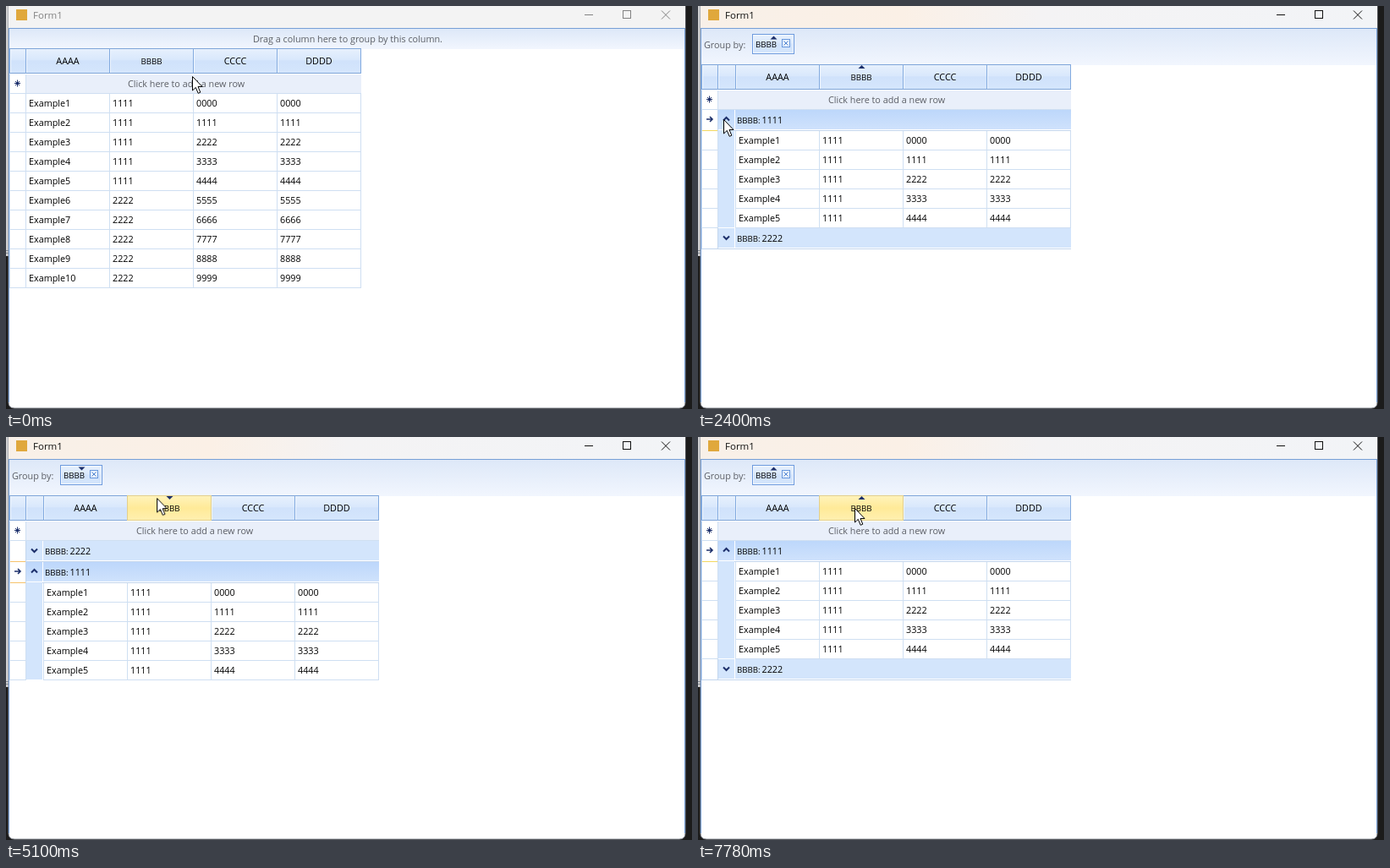
These frames come from a looping animation (811 px wide and 477 px high, 8 s). An HTML page:

```html
<!DOCTYPE html>
<html lang="en">
<head>
<meta charset="utf-8">
<title>Grouped grid</title>
<style>
html, body { margin: 0; width: 100%; height: 100%; overflow: hidden; background: #1b1b1b; }
svg { display: block; width: 811px; height: 477px; }
text { font: 10.8px "Open Sans", "Noto Sans", sans-serif; fill: #000; }
text.field { font-size: 9.7px; }
text.hint { fill: #5c5f66; }
text.title { font-size: 11.5px; }
.mid { text-anchor: middle; }
rect { shape-rendering: crispEdges; }
</style>
</head>
<body>
<svg id="stage" viewBox="0 0 811 477">
  <defs>
    <linearGradient id="active">
      <stop offset="0" stop-color="#f8f0e8"/><stop offset=".3" stop-color="#fbf0e6"/>
      <stop offset=".5" stop-color="#f4f3f4"/><stop offset="1" stop-color="#f2f4f7"/>
    </linearGradient>
    <linearGradient id="panel" x2="0" y2="1">
      <stop offset="0" stop-color="#dde8f8"/><stop offset="1" stop-color="#f2f6fe"/>
    </linearGradient>
    <linearGradient id="head" x2="0" y2="1">
      <stop offset="0" stop-color="#e8f1fd"/><stop offset=".45" stop-color="#d9e8fc"/>
      <stop offset=".5" stop-color="#d0e2fb"/><stop offset="1" stop-color="#d5e6fc"/>
    </linearGradient>
    <linearGradient id="hover" x2="0" y2="1">
      <stop offset="0" stop-color="#fff3bb"/><stop offset=".5" stop-color="#ffea98"/>
      <stop offset="1" stop-color="#fff0b0"/>
    </linearGradient>
    <linearGradient id="press" x2="0" y2="1">
      <stop offset="0" stop-color="#f9c682"/><stop offset=".3" stop-color="#ffbf6c"/>
      <stop offset="1" stop-color="#ffd598"/>
    </linearGradient>
    <linearGradient id="current" x2="0" y2="1">
      <stop offset="0" stop-color="#bdd7fb"/><stop offset="1" stop-color="#cfe2fc"/>
    </linearGradient>
    <linearGradient id="ghost">
      <stop offset="0" stop-color="#ffb45c" stop-opacity=".42"/>
      <stop offset=".6" stop-color="#ffc987" stop-opacity=".32"/>
      <stop offset="1" stop-color="#ffe3c0" stop-opacity=".08"/>
    </linearGradient>
    <linearGradient id="ghostEdge" gradientUnits="userSpaceOnUse" x1="-50" x2="50">
      <stop offset="0" stop-color="#ef9440" stop-opacity=".8"/>
      <stop offset="1" stop-color="#ef9440" stop-opacity=".1"/>
    </linearGradient>
  </defs>
</svg>
<script>
const LOOP = 8000;
const BLUE = '#769fd6', LINE = '#cfdff2', NAVY = '#1c2f6b', GROUP = '#d3e5fc', ORANGE = '#ee8a2e';
const stage = document.getElementById('stage');

function add(parent, tag, attrs = {}, content = '') {
  const node = document.createElementNS(stage.namespaceURI, tag);
  for (const key in attrs) node.setAttribute(key, attrs[key]);
  node.textContent = content;
  return parent.appendChild(node);
}
const group = parent => add(parent, 'g');
const box = (parent, x, y, width, height, fill) => add(parent, 'rect', { x, y, width, height, fill });
const frame = (parent, x, y, width, height, fill, stroke) =>
  add(parent, 'rect', { x: x + .5, y: y + .5, width: width - 1, height: height - 1, fill, stroke });
const label = (parent, x, y, content, cls = '') => add(parent, 'text', { x, y, class: cls }, content);
const line = (parent, d, stroke, width = 1) =>
  add(parent, 'path', { d, stroke, fill: 'none', 'stroke-width': width });

// Visible only inside the given time ranges.
function show(node, ...ranges) {
  const steps = new Map([[0, 0]]);
  for (const [from, to] of ranges) steps.set(from, 1).set(to, to === LOOP ? 1 : 0);
  if (!steps.has(LOOP)) steps.set(LOOP, 0);
  const frames = [...steps].map(([t, opacity]) => ({ offset: t / LOOP, opacity, easing: 'steps(1, end)' }));
  node.animate(frames, { duration: LOOP, iterations: Infinity });
  return node;
}

const FLAT = [[0, 1290]], GROUPED = [[1290, LOOP]];
const ASC = [[1290, 3360], [5890, 6700], [7360, LOOP]];
const DESC = [[3360, 5890], [6700, 7360]];
const HEAD_PRESS = [[3230, 3430], [4160, 4290], [4620, 4760]];
const HEAD_HOVER = [[2890, 3230], [3430, 4160], [4290, 4620], [4760, 5140], [7640, LOOP]];
const CHIP_PRESS = [[5760, 5890], [6570, 6700], [7230, 7360]];
const CHIP_HOVER = [[5390, 5760], [5890, 6570], [6700, 7230], [7360, 7500]];
const DRAG = [[620, 1290]];
const CURSOR = [
  [0, 220, 83], [60, 220, 83], [200, 184, 66], [550, 184, 66], [830, 184, 47], [960, 184, 47],
  [1160, 168, 39], [1500, 168, 39], [1710, 100, 112], [1780, 98, 113], [2260, 30, 134], [2540, 30, 134],
  [3030, 210, 80], [4960, 210, 80], [5500, 88, 50], [7430, 88, 50], [7780, 185, 84], [8000, 185, 84]
];

function drawWindow() {
  box(stage, 0, 0, 4, 296, '#cfcfd1');
  box(stage, 0, 289, 3, 1, '#7d8792');
  box(stage, 0, 292, 3, 1, '#7d8792');
  add(stage, 'path', { d: 'M3 0H803V469Q803 476 796 476H10Q3 476 3 469Z', fill: '#fff', stroke: '#8b9099' });
  titleBar('#f3f3f3', '#828282', [0, 480]);
  titleBar('url(#active)', '#111', [480, LOOP]);
  box(stage, 12, 4, 13, 13, '#e0a83c');
  line(stage, 'M3 26.5H803M3.5 26V469M802.5 26V469', BLUE);
}

function titleBar(fill, ink, range) {
  const bar = show(group(stage), range);
  box(bar, 3, 0, 800, 26, fill);
  label(bar, 32, 15, 'Form1', 'title').style.fill = ink;
  line(bar, 'M684 10.5H694M775 5.5L785 15.5M785 5.5L775 15.5', ink);
  add(bar, 'rect', { x: 729.5, y: 5.5, width: 9, height: 9, rx: 1, fill: 'none', stroke: ink });
}

function drawHeader(parent, y, x0, indented, hover, press) {
  const right = x0 + 396, bx = x0 + 99;
  box(parent, 4, y, right - 3, 30, 'url(#head)');
  line(parent, `M4 ${y + .5}H${right + 1}M4 ${y + 29.5}H${right + 1}`, '#7fa5d8');
  const edges = [4, 23, x0, bx, x0 + 198, x0 + 297, right];
  for (const x of edges) {
    line(parent, `M${x + .5} ${y}V${y + 30}`, '#82aadf');
    if (x < right) line(parent, `M${x + 1.5} ${y + 1}V${y + 29}`, '#f0f6fe');
  }
  show(frame(parent, bx, y, 100, 30, 'url(#hover)', '#e3cf8c'), ...hover);
  show(frame(parent, bx, y, 100, 30, 'url(#press)', ORANGE), ...press);
  [...'ABCD'].forEach((c, i) =>
    label(parent, x0 + 50 + 99 * i, y + 19, c.repeat(4), c === 'B' ? 'mid field' : 'mid'));
  // Row for new entries
  const top = y + 31;
  box(parent, 23, top, right - 22, 22, '#e9effa');
  line(parent, `M4 ${top + 22.5}H${right + 1}M4.5 ${top}V${top + 23}M23.5 ${top}V${top + 23}`, LINE);
  const cy = top + 10.5;
  line(parent, `M13.5 ${cy - 4}V${cy + 4}M10 ${cy}H17M11 ${cy - 2.5}L16 ${cy + 2.5}M16 ${cy - 2.5}L11 ${cy + 2.5}`, NAVY);
  label(parent, indented ? 223 : 213, top + 15, 'Click here to add a new row', 'mid hint');
}

function drawRow(parent, index, x0, y) {
  const code = String(index < 5 ? 1 : 2).repeat(4), count = String(index).repeat(4);
  [`Example${index + 1}`, code, count, count].forEach((value, i) => {
    label(parent, x0 + 4 + 99 * i, y + 15, value);
    line(parent, `M${x0 + 99 * i + .5} ${y}V${y + 23}`, LINE);
  });
  const right = x0 + 396.5;
  line(parent, `M4 ${y + 22.5}H23M${x0} ${y + 22.5}H${right}M${right} ${y}V${y + 23}M4.5 ${y}V${y + 23}M23.5 ${y}V${y + 23}`, LINE);
}

function drawGroupRow(parent, y, value, open, first) {
  box(parent, 24, y, 19, 23, open ? 'url(#current)' : GROUP);
  box(parent, 44, y, 397, 23, open ? 'url(#current)' : GROUP);
  line(parent, `M4 ${y + 24.5}H441M4.5 ${y}V${y + 25}M23.5 ${y}V${y + 25}`, '#c3d6ee');
  const s = open ? -1 : 1, cy = y + 11;
  line(parent, `M30 ${cy - 1.5 * s}L33.5 ${cy + 2 * s}L37 ${cy - 1.5 * s}`, NAVY, 2);
  label(parent, 46, y + 16, 'BBBB:', 'field');
  label(parent, 75.5, y + 16, value);
  if (!open) return;
  line(parent, `M10 ${cy}H16M14 ${cy - 3}L17 ${cy}L14 ${cy + 3}`, NAVY, 1.6);
  line(parent, `M5 ${y + 24.5}H23` + (first ? '' : `M5 ${y - .5}H23`), first ? '#f3d860' : '#f6c26b');
}

function drawChildren(parent, y) {
  box(parent, 24, y - 1, 19, 115, GROUP);
  for (let i = 0; i < 5; i++) drawRow(parent, i, 44, y + 23 * i);
}

function sortMarks(parent, up) {
  for (const [x, y] of [[193.5, 70], [89.5, 35.5]]) {
    const [base, tip] = up ? [y + 4, y] : [y, y + 4];
    add(parent, 'path', { d: `M${x - 4} ${base}H${x + 4}L${x} ${tip}Z`, fill: NAVY });
  }
}

function drawFlat() {
  const view = show(group(stage), ...FLAT);
  box(view, 4, 27, 798, 24, 'url(#panel)');
  label(view, 404, 43, 'Drag a column here to group by this column.', 'mid hint');
  drawHeader(view, 50, 23, false, [[130, 480]], [[480, 1290]]);
  for (let i = 0; i < 10; i++) drawRow(view, i, 23, 104 + 23 * i);
}

function drawGrouped() {
  const view = show(group(stage), ...GROUPED);
  box(view, 4, 27, 798, 43, 'url(#panel)');
  label(view, 7, 50, 'Group by:', 'hint');
  frame(view, 64, 33, 50, 24, 'url(#head)', '#6c9ade');
  frame(view, 65, 34, 48, 22, 'none', '#f2f7fe');
  show(frame(view, 64, 33, 50, 24, 'url(#hover)', '#6c9ade'), ...CHIP_HOVER);
  show(frame(view, 64, 33, 50, 24, 'url(#press)', ORANGE), ...CHIP_PRESS);
  label(view, 68, 49, 'BBBB', 'field');
  add(view, 'rect', { x: 99.5, y: 39.5, width: 9, height: 9, rx: 1, fill: '#e9f2fe', stroke: '#6797dc' });
  line(view, 'M101.5 41.5L106.5 46.5M106.5 41.5L101.5 46.5', '#4f83cf');
  drawHeader(view, 69, 44, true, HEAD_HOVER, HEAD_PRESS);

  const closed = show(group(view), [1290, 2400]);
  drawGroupRow(closed, 123, '1111', false);
  drawGroupRow(closed, 148, '2222', false);
  const pointed = show(group(view), [1920, 2400]);
  box(pointed, 24, 123, 417, 23, '#6ea8f5').setAttribute('opacity', .18);

  const ascending = show(group(view), [2400, ASC[0][1]], ...ASC.slice(1));
  drawGroupRow(ascending, 123, '1111', true, true);
  drawChildren(ascending, 148);
  drawGroupRow(ascending, 263, '2222', false);

  const descending = show(group(view), ...DESC);
  drawGroupRow(descending, 123, '2222', false);
  drawGroupRow(descending, 148, '1111', true);
  drawChildren(descending, 173);

  sortMarks(show(group(view), ...ASC), true);
  sortMarks(show(group(view), ...DESC), false);
}

function drawCursor() {
  const cursor = group(stage);
  const ghost = show(group(cursor), ...DRAG);
  add(ghost, 'rect', { x: -49.5, y: -15.5, width: 99, height: 29, fill: 'url(#ghost)', stroke: 'url(#ghostEdge)' });
  show(add(cursor, 'circle', { r: 12.5, cy: -1, fill: '#ffe21f', 'fill-opacity': .68 }),
    [480, 1290], [2330, 2400], ...HEAD_PRESS, ...CHIP_PRESS);
  const carried = show(group(cursor), ...DRAG);
  label(carried, 0, 2, 'BBBB', 'mid field').style.opacity = .45;
  add(carried, 'rect', { x: 2.5, y: 16.5, width: 11, height: 6, fill: '#fff', stroke: '#000', 'stroke-dasharray': '1 1' });
  add(cursor, 'path', {
    d: 'M.5 .5V17L4.3 13.4L7.2 20.3L9.8 19.2L7 12.5H12Z',
    fill: '#fff', stroke: '#000', 'stroke-linejoin': 'round'
  });
  cursor.animate(CURSOR.map(([t, x, y]) => ({ offset: t / LOOP, transform: `translate(${x}px, ${y}px)` })),
    { duration: LOOP, iterations: Infinity });
}

drawWindow();
drawFlat();
drawGrouped();
drawCursor();
</script>
</body>
</html>
```
